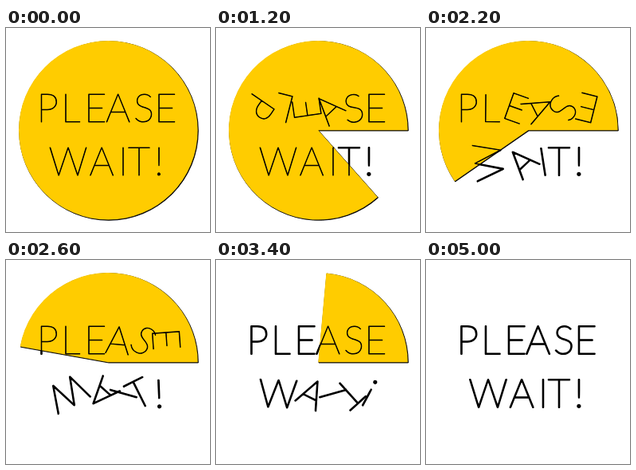
An HTML page with a canvas that plays this animation: 256x256 px, repeating every 5050 ms.

```html
<!DOCTYPE html>
<html lang="en">
<head>
<meta charset="utf-8">
<title>Please wait</title>
<style>
  html, body { margin: 0; width: 100%; height: 100%; overflow: hidden; background: #fff; }
  canvas { display: block; width: 100vw; height: 100vh; }
</style>
</head>
<body>
<canvas width="256" height="256" aria-label="Please wait!"></canvas>
<script>
const LOOP = 5050, STEP = 50, SWEEP = 5020;
const SPIN = 2000, STAGGER = 250;
const CENTER = 128.3, RADIUS = 112.3;
const HALF_CAP = 17.5;
const ctx = document.querySelector('canvas').getContext('2d');

// Each line: text, vertical centre, horizontal centre of every letter
const lines = [
  ['PLEASE', 100.5, [54, 83.5, 113.5, 141, 172.5, 201.5]],
  ['WAIT!', 167.5, [78, 120.5, 147, 167, 192]]
];
const letters = lines.flatMap(([text, y, xs]) =>
  [...text].map((char, i) => ({ char, x: xs[i], y })));

// Sinusoidal ease in and out, clamped to 0..1
const ease = u => (1 - Math.cos(Math.PI * Math.min(1, Math.max(0, u)))) / 2;

function drawText(time, outline) {
  ctx.font = '100 49px Lato, "Open Sans", sans-serif';
  ctx.textAlign = 'center';
  ctx.fillStyle = ctx.strokeStyle = '#000';
  ctx.lineWidth = outline;
  ctx.lineJoin = 'round';
  letters.forEach(({ char, x, y }, i) => {
    const ink = ctx.measureText(char);
    const dx = (ink.actualBoundingBoxLeft - ink.actualBoundingBoxRight) / 2;
    ctx.save();
    ctx.translate(x, y);
    ctx.rotate(-2 * Math.PI * ease((time - i * STAGGER) / SPIN));
    ctx.fillText(char, dx, HALF_CAP);
    ctx.strokeText(char, dx, HALF_CAP);
    ctx.restore();
  });
}

function tracePie(start, offset) {
  const c = CENTER + offset;
  ctx.beginPath();
  if (start > 0) ctx.moveTo(c, c);
  ctx.arc(c, c, RADIUS, start, 2 * Math.PI);
  ctx.closePath();
}

function drawPie(time) {
  if (time >= LOOP - STEP) return;
  const start = 2 * Math.PI * ease(time / SWEEP);
  tracePie(start, 0.7);
  ctx.fillStyle = ctx.strokeStyle = '#000';
  ctx.lineWidth = 0.9;
  ctx.lineJoin = 'round';
  ctx.fill();
  ctx.stroke();
  tracePie(start, 0);
  ctx.fillStyle = '#fc0';
  ctx.fill();
}

function draw(now) {
  const time = Math.floor((now % LOOP) / STEP) * STEP;
  ctx.fillStyle = '#fff';
  ctx.fillRect(0, 0, 256, 256);
  // Lettering looks heavier on white than on the disc
  drawText(time, 2);
  drawPie(time);
  drawText(time, 0.9);
}

let begin;
function tick(now) {
  begin ??= now;
  draw(now - begin);
  requestAnimationFrame(tick);
}
draw(0);
requestAnimationFrame(tick);
</script>
</body>
</html>
```
